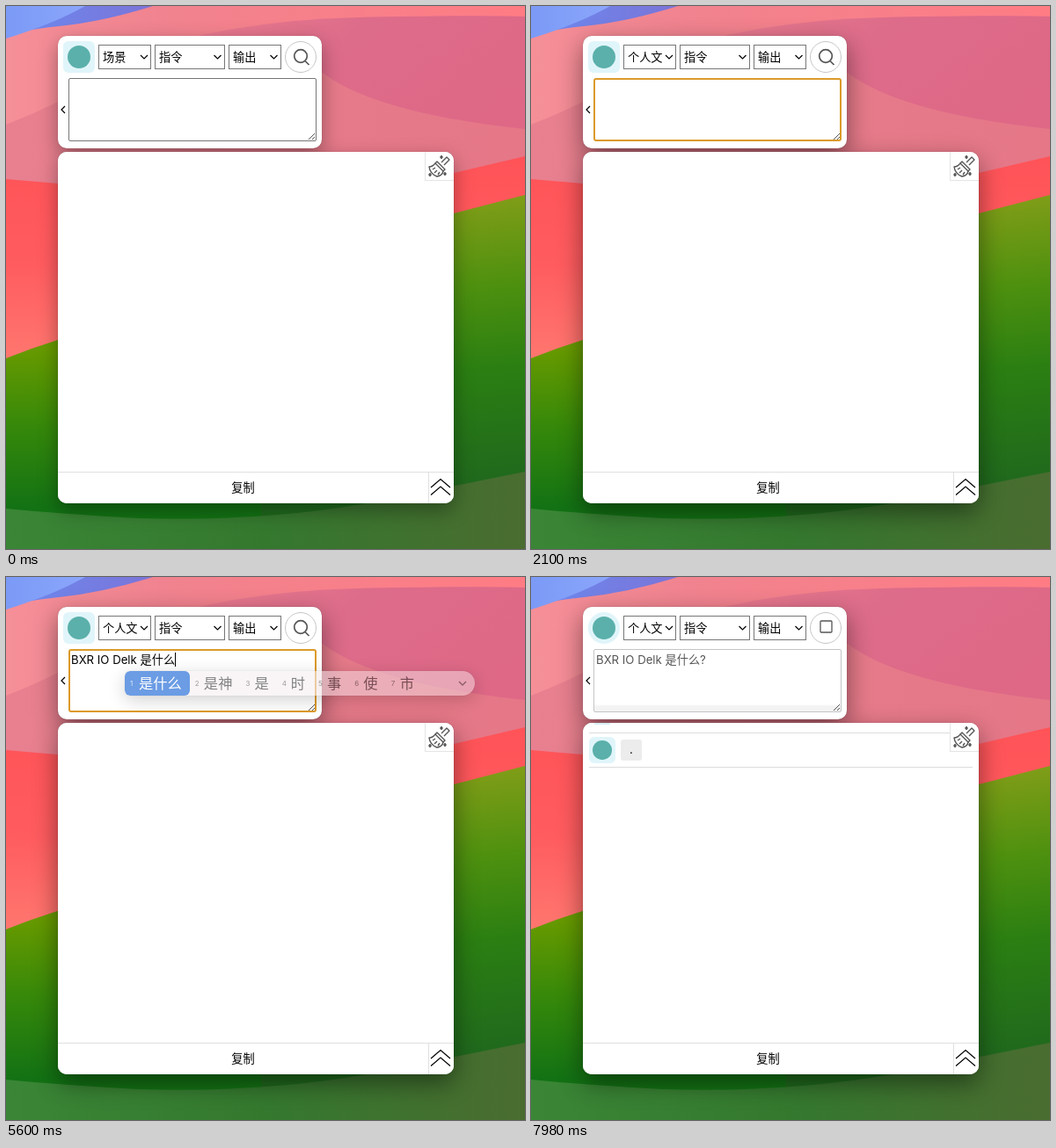
Recreate the animation shown at these times as an HTML page. Size 590x618 px, loop 8 s.

```html
<!DOCTYPE html>
<html lang="zh-CN">
<head>
<meta charset="utf-8">
<title>Assistant panel</title>
<style>
html, body { margin: 0; width: 100%; height: 100%; overflow: hidden; }
body {
  position: relative;
  font: 13.2px/16px Inter, "Noto Sans CJK SC", "Noto Sans CJK", sans-serif;
  color: #000;
}
div, svg { position: absolute; box-sizing: border-box; }
.wall, .icons { left: 0; top: 0; width: 590px; height: 618px; }
.panel {
  left: 59px; background: #fff; border-radius: 10px;
  box-shadow: 0 0 1px rgba(0,0,0,.4), 0 10px 28px rgba(0,0,0,.45);
}
.idle .panel { box-shadow: 0 0 1px rgba(0,0,0,.35), 0 8px 22px rgba(0,0,0,.35); }
#form { top: 34px; width: 300px; height: 128px; }
#chat { top: 166px; width: 450px; height: 400px; overflow: hidden; }
.shade { top: 166px; width: 450px; height: 400px; }
.tile { background: #e0f5fa; border-radius: 6px; }
.tile::after {
  content: ""; position: absolute; inset: 14%;
  border-radius: 50%; background: #5bb0ab;
}
.busy #form .tile { border-radius: 50%; }
.select {
  top: 10px; height: 28px; border: 1px solid #767676;
  padding: 5px 0 0 4px; white-space: nowrap;
}
.ring { left: 258px; top: 6px; width: 36px; height: 36px; border: 1px solid #c6c6c6; border-radius: 50%; }
#box { left: 12px; top: 48px; width: 282px; height: 72px; border: 1px solid #767676; border-radius: 2px; }
.focus #box { border: 2px solid #dc9a2a; border-radius: 3px; }
.busy #box { border-color: #c4c4c4; background: linear-gradient(#fff 62px, #f3f3f3 64px); }
#text { left: 74px; top: 85px; white-space: pre; }
.busy #text { color: #555; }
#comp { border-bottom: 1.5px solid #3b78d8; }
#comp:empty { border: 0; }
#caret { position: absolute; width: 1px; height: 16px; background: #000; }
.msg { display: none; }
.reply .msg { display: block; }
.rule { left: 7px; height: 1px; background: #dcdcdc; }
.bubble {
  left: 43px; top: 19px; width: 24px; height: 24px;
  background: #ececec; border-radius: 3px; text-align: center; line-height: 22px;
}
.broom { left: 417px; top: 0; width: 33px; height: 33px; border: solid #e4e4e4; border-width: 0 0 1px 1px; }
.foot { left: 0; top: 364px; width: 450px; height: 36px; border-top: 1px solid #e0e0e0; }
.copy { left: 0; width: 422px; height: 35px; border-right: 1px solid #e0e0e0; text-align: center; line-height: 35px; font-weight: 500; }
.icons { fill: none; stroke: #000; stroke-width: 1.2; }
.stop, .busy .find { display: none; }
.busy .stop { display: inline; }
#menu {
  left: 97px; top: 41px; width: 134px; height: 209px;
  background: #ebe6e8; border-radius: 6px; color: #1c1c1c;
  box-shadow: 0 0 1px rgba(0,0,0,.5), 0 4px 12px rgba(0,0,0,.25);
}
.row { left: 5px; width: 123px; height: 22px; padding-left: 19px; border-radius: 4px; line-height: 22px; font-size: 13.1px; white-space: nowrap; }
.row.on { background: #5590ea; color: #fff; font-weight: 500; }
.tick { left: 5px; }
#bar {
  left: 135px; top: 107px; width: 398px; height: 28px;
  border-radius: 6px 14px 14px 6px; overflow: hidden;
  background: linear-gradient(90deg, #f6eff1 0 215px, #efd3d9 235px, #efccd3);
  color: #333;
}
#cast { left: 135px; top: 107px; width: 398px; height: 28px; border-radius: 6px 14px 14px 6px; box-shadow: 0 0 1px rgba(0,0,0,.45), 0 5px 20px rgba(0,0,0,.3); }
#cells { left: 0; top: 0; height: 28px; display: flex; }
.cell { position: relative; flex: none; display: flex; align-items: center; height: 28px; padding: 0 9px 0 6px; font-size: 16.3px; }
.cell:first-child { background: #0a5bd3; color: #fff; border-radius: 6px; }
.cell small { width: 10px; font-size: 8px; opacity: .8; }
.cell b { width: 22px; height: 22px; font-weight: 700; }
.badge { border-radius: 4px; background: #3a2226; color: #fff; font-size: 15px; line-height: 19px; text-align: center; border: 2px solid #ec4a3c; box-sizing: border-box; background: #d8362f; }
.doze { font-style: italic; line-height: 22px; color: #1e74c8; white-space: nowrap; letter-spacing: -1px; }
.doze i { position: relative; }
#stub { top: 107px; width: 36px; height: 28px; border-radius: 6px; background: #f4eef0; }
.more { left: 379px; top: 11px; width: 10px; height: 7px; fill: none; stroke: #555; stroke-width: 1.4; }
</style>
</head>
<body>
<svg class="wall" viewBox="0 0 590 618">
  <defs>
    <linearGradient id="blue"><stop stop-color="#7b9af6"/><stop offset="1" stop-color="#8ba6fb"/></linearGradient>
    <linearGradient id="violet"><stop stop-color="#6b8af0"/><stop offset="1" stop-color="#7b74d8"/></linearGradient>
    <linearGradient id="pink"><stop stop-color="#f58f98"/><stop offset=".3" stop-color="#f0838f"/><stop offset="1" stop-color="#ff7c84"/></linearGradient>
    <linearGradient id="rose" x2="1" y2=".5"><stop stop-color="#ee8190"/><stop offset=".5" stop-color="#dd6c8a"/><stop offset="1" stop-color="#de6886"/></linearGradient>
    <linearGradient id="dusk"><stop stop-color="#e8808f"/><stop offset="1" stop-color="#e57787"/></linearGradient>
    <linearGradient id="red" x2="0" y2="1"><stop stop-color="#ff5358"/><stop offset=".5" stop-color="#ff5c5f"/><stop offset="1" stop-color="#ff7b72"/></linearGradient>
    <linearGradient id="green" gradientUnits="userSpaceOnUse" x1="0" y1="390" x2="0" y2="570"><stop stop-color="#679a00"/><stop offset=".5" stop-color="#35880a"/><stop offset="1" stop-color="#137214"/></linearGradient>
    <linearGradient id="slope" gradientUnits="userSpaceOnUse" x1="530" y1="220" x2="560" y2="540"><stop stop-color="#809d18"/><stop offset=".3" stop-color="#4f910f"/><stop offset=".6" stop-color="#2b7f12"/><stop offset="1" stop-color="#20691d"/></linearGradient>
    <linearGradient id="low"><stop stop-color="#3a8636"/><stop offset=".5" stop-color="#34782e"/><stop offset="1" stop-color="#4a6c30"/></linearGradient>
  </defs>
  <rect width="590" height="618" fill="url(#pink)"/>
  <path d="M0 0H167Q110 18 60 23T0 37Z" fill="url(#violet)"/>
  <path d="M0 0H90Q55 20 0 37Z" fill="url(#blue)"/>
  <path d="M130 60Q250 16 400 13T590 12V200H130Z" fill="url(#rose)"/>
  <path d="M0 135Q60 112 110 80L360 76Q420 122 590 140V220H0Z" fill="url(#dusk)"/>
  <path d="M0 197L59 202Q300 240 509 190L590 171V420H0Z" fill="url(#red)"/>
  <path d="M0 401Q30 389 59 380L300 300V618H0Z" fill="url(#green)"/>
  <path d="M290 304Q430 250 509 236L590 215V618H290Z" fill="url(#slope)"/>
  <path d="M0 572Q60 578 150 583Q320 588 460 556L590 530V618H0Z" fill="url(#low)"/>
</svg>

<div class="panel shade"></div>
<div class="panel" id="form">
  <div class="tile" style="left:6px;top:6px;width:36px;height:36px"></div>
  <div class="select" style="left:46px;width:60px" id="scene"></div>
  <div class="select" style="left:110px;width:80px">指令</div>
  <div class="select" style="left:194px;width:60px">输出</div>
  <div class="ring"></div>
  <div id="box"></div>
</div>
<div class="panel" id="chat" style="box-shadow:none">
  <div class="msg">
    <div style="left:13px;top:0;width:18px;height:2px;background:#d5eef3"></div>
    <div class="rule" style="top:11px;width:410px"></div>
    <div class="tile" style="left:7px;top:16px;width:30px;height:30px"></div>
    <div class="bubble">.</div>
    <div class="rule" style="top:50px;width:436px"></div>
  </div>
  <div class="broom"></div>
  <div class="foot"><div class="copy">复制</div></div>
</div>

<svg class="icons" viewBox="0 0 590 618">
  <path d="M153 56l4 4 4-4M236.500 56l4 4 4-4M300.500 56l4 4 4-4M67 114l-4 4 4 4"/>
  <path d="M483 548l11-9.500 11 9.500M483 556.500l11-9.500 11 9.500"/>
  <path d="M344 152l7-7M348 152l3-3" stroke="#555" stroke-width="1"/>
  <g stroke="#555" stroke-width="1.700">
    <g class="find"><circle cx="335" cy="57" r="7.300"/><path d="M340 62.500l4.500 4.500"/></g>
    <rect class="stop" x="329" y="50" width="13" height="13" rx="1" stroke-width="1.300"/>
  </g>
  <g stroke="#555" stroke-width="1.400" stroke-linejoin="round">
    <path d="M495 178l6-6 3 3-6 6"/>
    <path d="M490 177l9 9-2 2-9-9z"/>
    <path d="M488 179q-3 4-7 4 1 8 9 11 6-1 7-6M485 186l3-2M487 190l3-3M491 192l2-3"/>
    <path d="M495 170l1.500 2-1.500 2-1.500-2zM482 190l1.500 2-1.500 2-1.500-2zM499 189l1.500 2-1.500 2-1.500-2z" fill="#555" stroke-width=".8"/>
  </g>
</svg>

<div id="text"><span id="done"></span><span id="comp"></span><span id="caret"></span></div>
<div id="stub"></div>
<div id="cast"></div>
<div id="bar">
  <div id="cells"></div>
  <svg class="more" viewBox="0 0 10 7"><path d="M1 1l4 4 4-4"/></svg>
</div>
<div id="menu"></div>

<script>
const LOOP = 8000;
const $ = id => document.getElementById(id);
const NAME = 'BXR IO Delk ';
const ASK = NAME + '是什么';
const KEYS = [2240, 2310, 2450, 2590, 2940, 3080, 3150, 3500, 3570, 3850, 3920, 3990];

// [time, committed, composing]
const typing = [
  [0, '', ''],
  ...KEYS.map((t, i) => [t, NAME.slice(0, i + 1), '']),
  [4550, NAME, 's'], [4900, NAME, 'sh'], [4970, NAME, 'shi'],
  [5040, NAME, 'shi s'], [5110, NAME, 'shi sh'], [5250, NAME, 'shi she'],
  [5320, NAME, 'shi shen'], [5390, NAME, 'shi shen m'], [5460, NAME, 'shi shen me'],
  [5600, ASK, ''], [6230, ASK, '?'], [6300, ASK + '?', '']
];
const hover = [[0, 0], [420, 2], [490, 4], [560, 6], [700, 7], [840, 8], [1120, -1], [1190, 8]];
const menuFade = [[0, 0], [140, 1], [1190, .8], [1260, .55], [1330, .3], [1400, .12], [1470, 0]];
const barFade = [[0, 0], [4760, 1], [5600, .6], [5670, .25], [5740, 0]];
const castFade = [[0, 0], [4760, .5], [4830, 1], [5600, .6], [5670, .25], [5740, 0]];

const scenes = ['场景', '写作助理', '英语翻译和改进', '旅游指南', '时间旅行指南',
  '提问助手', '禾曲学习法教练', '你是一个疯子', '个人文档助手'];
$('menu').innerHTML = scenes.map((s, i) =>
  `<div class="row" style="top:${6 + 22 * i}px">${i ? '' : '<div class="tick">✓</div>'}${s}</div>`).join('');
const rows = [...document.querySelectorAll('.row')];

const badge = '<b class="badge">合</b>';
const doze = '<b class="doze"><i style="font-size:10px;top:4px">z</i><i style="font-size:13px">z</i><i style="font-size:16px;top:-4px">Z</i></b>';
const lists = [
  ['是', '时候', '说', '适合', badge, '睡', doze, '谁'],
  ['是什么', '是神', '是', '时', '事', '使', '市']
].map(list => list.map((w, i) => `<div class="cell"><small>${i + 1}</small>${w}</div>`).join(''));

const at = (steps, t) => steps.findLast(s => s[0] <= t);
const within = (t, a, b) => t >= a && t < b;
let shown = -1;

function draw(t) {
  const cls = document.body.classList;
  cls.toggle('idle', t < 70);
  cls.toggle('focus', within(t, 1540, 7140));
  cls.toggle('busy', t >= 7140);
  cls.toggle('reply', t >= 7210);

  $('scene').textContent = t < 1470 ? '场景' : '个人文';
  $('menu').style.opacity = at(menuFade, t)[1];
  const lit = at(hover, t)[1];
  rows.forEach((r, i) => r.classList.toggle('on', i === lit));

  const [since, done, comp] = at(typing, t);
  $('done').textContent = done;
  $('comp').textContent = comp;
  $('text').style.top = (done.length > NAME.length ? 86 : 85) + 'px';
  const idle = t - Math.max(since, 1540);
  $('caret').style.opacity = within(t, 1540, 7140) && (idle < 560 || (comp || done === NAME || done === ASK)) ? 1 : 0;

  $('bar').style.opacity = at(barFade, t)[1];
  $('cast').style.opacity = at(castFade, t)[1];
  const list = t < 5250 ? 0 : 1;
  if (list !== shown) $('cells').innerHTML = lists[shown = list];

  const stub = within(t, 4550, 4760) || within(t, 6230, 6300);
  $('stub').style.opacity = stub ? 1 : 0;
  $('stub').style.left = (t < 6000 ? 135 : 175) + 'px';
}

function tick() {
  draw(performance.now() % LOOP);
  requestAnimationFrame(tick);
}
tick();
</script>
</body>
</html>
```
